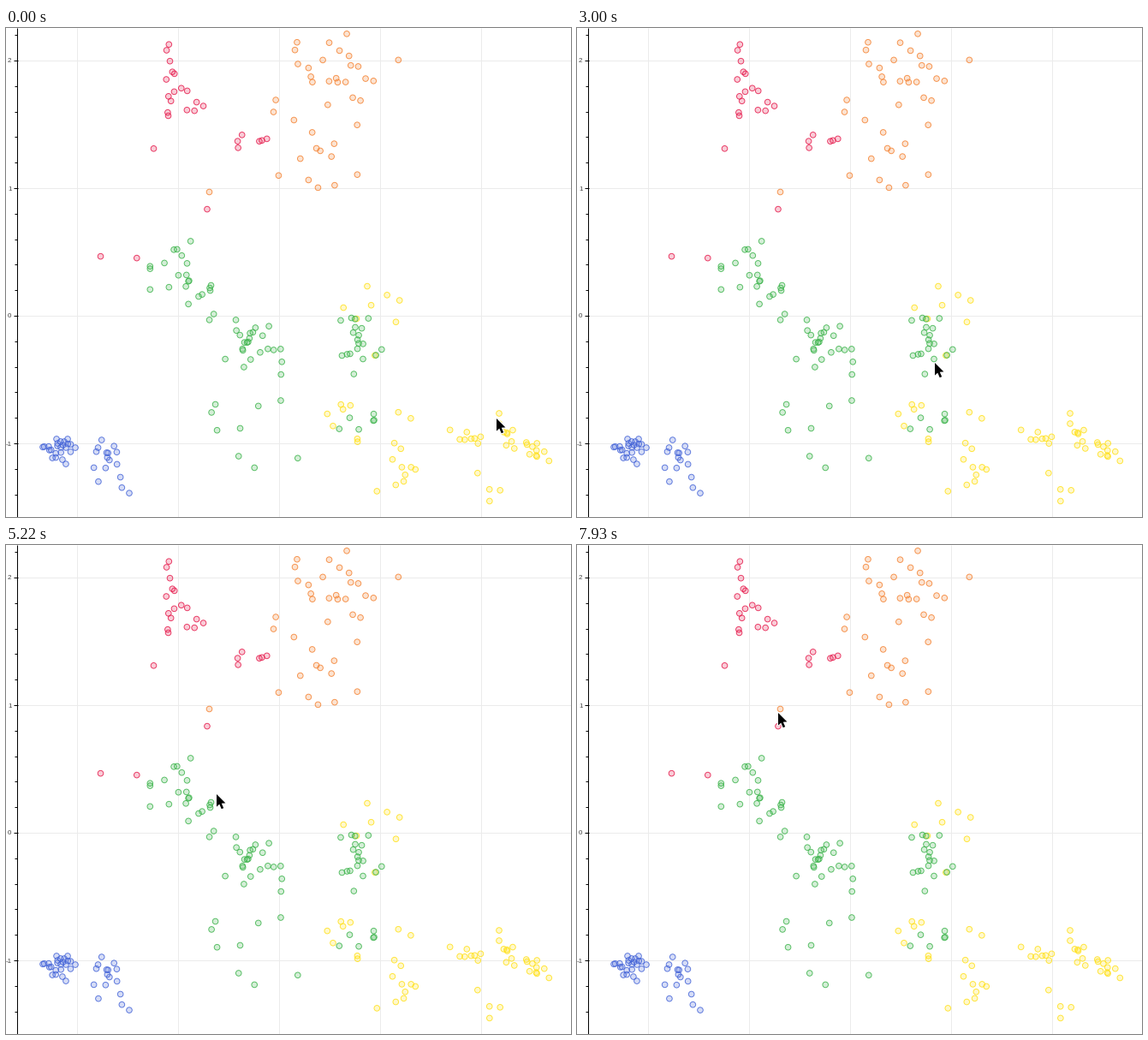
A matplotlib script for the animation above (7990 ms loop, 660 by 571 pixels).

```python
import numpy as np
import matplotlib.pyplot as plt
from matplotlib.animation import FuncAnimation
from matplotlib.patches import Polygon, Rectangle
from matplotlib.transforms import Affine2D

W, H, DPI = 660, 571, 100
LOOP, INTERVAL = 7990, 34
PX = 72 / DPI  # points per pixel

RED, ORANGE, YELLOW = "#e6194b", "#f58231", "#ffe119"
GREEN, BLUE = "#3cb44b", "#4363d8"
CARBON, NITROGEN, OXYGEN = "black", "#3333ff", "#ff1a1a"

# Point clouds: color, count, center x, y, spread x, y, tilt.
CLOUDS = [
    (ORANGE, 26, 398, 60, 45, 28, 0), (ORANGE, 12, 360, 155, 35, 25, 0),
    (RED, 18, 197, 80, 22, 32, 0), (RED, 6, 298, 131, 26, 5, -0.15),
    (RED, 3, 215, 250, 55, 22, 0),
    (YELLOW, 8, 428, 345, 22, 34, 0), (YELLOW, 9, 410, 460, 50, 14, 0),
    (YELLOW, 10, 465, 522, 18, 26, 0.5), (YELLOW, 8, 538, 473, 14, 8, 0),
    (YELLOW, 16, 608, 494, 14, 10, 0.5), (YELLOW, 4, 562, 540, 8, 14, 0),
    (GREEN, 20, 212, 290, 23, 22, 0.2), (GREEN, 24, 283, 368, 25, 20, 0.5),
    (GREEN, 9, 280, 462, 32, 26, 0.2), (GREEN, 18, 407, 370, 17, 18, 0.2),
    (GREEN, 6, 410, 465, 18, 8, -0.2),
    (BLUE, 24, 62, 494, 10, 9, 0.1), (BLUE, 16, 120, 517, 16, 18, 0.6),
]
# Points the pointer visits.
VISITED = {
    ORANGE: [(236.5, 190.5)],
    YELLOW: [(576, 450), (576, 462), (585.5, 474)],
    GREEN: [(417, 386.5), (239.5, 300.5), (225, 313.5)],
}

# Pointer moves: start, end, x, y of the tip on arrival.
START = np.array([573, 456.5])
MOVES = [
    (50, 310, 572, 470), (720, 780, 577, 476), (960, 1140, 581, 467),
    (1380, 1770, 586, 473), (2550, 2990, 418, 391), (3060, 3170, 416, 394),
    (3650, 3770, 415, 387), (4010, 4120, 414, 385), (4650, 5215, 246, 291),
    (5280, 5340, 238, 290), (5450, 5690, 238, 305), (6170, 6560, 222, 312),
    (7290, 7460, 219, 204), (7700, 7920, 235, 196),
]
HOTSPOT = np.array([3, 0.5])

fig = plt.figure(figsize=(W / DPI, H / DPI), dpi=DPI, facecolor="white")
ax = fig.add_axes([0, 0, 1, 1])
ax.set_xlim(0, W)
ax.set_ylim(H, 0)
ax.axis("off")


def line(points, color, width=1.0, z=0, transform=ax.transData):
    x, y = zip(*points)
    return ax.plot(x, y, color=color, lw=width * PX, zorder=z, transform=transform,
                   solid_capstyle="butt", solid_joinstyle="round")[0]


def label(x, y, text, size, color, z, ha="center", transform=ax.transData):
    return ax.text(x, y, text, fontsize=size * PX, color=color, zorder=z, ha=ha,
                   va="center_baseline", family="Liberation Sans",
                   transform=transform)


def draw_axes():
    for x in range(83, W, 118):
        line([(x, 0), (x, H)], "#ebebeb")
    for value in range(-1, 3):
        y = 336 - 149 * value
        line([(13, y), (W, y)], "#ebebeb")
        line([(9, y), (14, y)], "black", z=1)
        label(6.5, y, str(value), 8, "#444444", 1, ha="right")
    for k in range(-7, 12):
        y = 336 - 149 * k / 5
        line([(10, y), (13, y)], "black", z=1)
    line([(13, 0), (13, H)], "black", z=1)


def draw_points(points, color, z):
    x, y = np.transpose(points)
    rgb = tuple(int(color[i:i + 2], 16) / 255 for i in (1, 3, 5))
    # A size per point keeps the subpixel positions.
    ax.scatter(x, y, s=np.full(len(x), (6.6 * PX) ** 2), facecolors=[rgb + (0.22,)],
               edgecolors=[rgb + (0.85,)], linewidths=0.95 * PX, zorder=z)


def draw_clouds():
    rng = np.random.default_rng(7)
    for z, (color, count, cx, cy, sx, sy, tilt) in enumerate(CLOUDS):
        dx, dy = np.clip(rng.normal(size=(2, count)), -1.9, 1.9)
        points = np.column_stack([cx + sx * dx, cy + sy * dy + tilt * sx * dx])
        draw_points(points, color, 2 + z / 10)
    for color, points in VISITED.items():
        draw_points(points, color, 5)


# Molecule geometry: strokes are (color, points), headings are in degrees.
def polygon(cx, cy, r, n=6, turn=-90):
    a = np.radians(turn + 360 / n * np.arange(n))
    return np.column_stack([cx + r * np.cos(a), cy + r * np.sin(a)])


def walk(start, headings, step):
    a = np.radians(headings)
    steps = step * np.column_stack([np.cos(a), np.sin(a)])
    return np.vstack([start, start + np.cumsum(steps, axis=0)])


def closed(ring):
    return [(CARBON, np.vstack([ring, ring[:1]]))]


def aromatic(ring):
    inner = ring * 0.75 + ring.mean(axis=0) * 0.25
    return closed(ring) + [(CARBON, inner[i:i + 2]) for i in (0, 2, 4)]


def bond_to(a, atom, color, reach=0.75):
    """Bond whose far half takes the color of its atom."""
    mid, end = a + (atom - a) * 0.45, a + (atom - a) * reach
    return [(CARBON, [a, mid]), (color, [mid, end])]


def indole():
    benzene = polygon(94.5, 35, 13.8, turn=15)
    pyrrole = polygon(74, 40, 11.8, n=5, turn=17)
    nitrogen = np.array([50.5, 72])
    oxygen = walk(benzene[0], [15], 14)[-1]
    methyl = walk(oxygen, [-45], 13)[-1]
    ring = walk(pyrrole[1], [90, 138], 15)
    cage = walk(pyrrole[2], [152, 191, 120, 62], 14.5)
    tail = walk(cage[1], [95, 145, 180, 145], 12.5)
    strokes = aromatic(benzene) + [
        (CARBON, pyrrole[:3]), (CARBON, pyrrole[1:3] * 0.75 + pyrrole.mean(axis=0) * 0.25),
        (CARBON, ring), (CARBON, cage), (CARBON, tail),
        (CARBON, walk(cage[3], [50], 9))]
    for a, atom, color in [(pyrrole[2], pyrrole[3], NITROGEN),
                           (pyrrole[4], pyrrole[3], NITROGEN),
                           (ring[-1], nitrogen, NITROGEN), (cage[-1], nitrogen, NITROGEN),
                           (benzene[0], oxygen, OXYGEN), (methyl, oxygen, OXYGEN)]:
        strokes += bond_to(a, atom, color)
    return 1.3, strokes, [(pyrrole[3] - (2, 0), "HN", NITROGEN),
                          (nitrogen, "N", NITROGEN), (oxygen, "O", OXYGEN)]


def amino_ketone():
    phenyl = polygon(80.5, 65.5, 13.5)
    carbonyl = walk(phenyl[0], [-90], 14)[-1]
    oxygen = walk(carbonyl, [-30], 13)[-1]
    alpha = walk(carbonyl, [210], 13.5)[-1]
    amine = walk(alpha, [150], 15)[-1]
    strokes = aromatic(phenyl) + [
        (CARBON, [phenyl[0], carbonyl, alpha]), (CARBON, walk(alpha, [-90], 13))]
    for shift in (-1, 1):
        offset = np.array([0.5, 0.9]) * shift
        strokes += bond_to(carbonyl + offset, oxygen + offset, OXYGEN)
    strokes += bond_to(alpha, amine, NITROGEN, reach=0.65)
    return 1.3, strokes, [(amine - (2, 0), "H$_2$N", NITROGEN), (oxygen, "O", OXYGEN)]


def piperidine():
    ring, top, bottom = polygon(72, 39, 6), polygon(80, 25, 6, turn=0), polygon(82, 74, 6)
    ester = walk(ring[0], [220], 5)[-1]
    oxo = walk(ester, [-80], 6)[-1]
    oxygen = walk(ester, [160], 6)[-1]
    chain = walk(ring[3], [80, 35, 90], 6)
    last = walk(chain[-1], [40], 5.5)[-1]
    strokes = aromatic(top) + aromatic(bottom) + closed(ring) + [
        (CARBON, [top[2], ring[0], ester]), (CARBON, walk(oxygen, [120, 175], 5.5)),
        (CARBON, chain), (CARBON, [last, bottom[0]]),
        (NITROGEN, [ring[2], ring[3], ring[4]])]
    for a, atom, color in [(ester, oxo, OXYGEN), (ester, oxygen, OXYGEN),
                           (chain[1], ring[3], NITROGEN), (chain[2], chain[3], OXYGEN),
                           (last, chain[3], OXYGEN)]:
        strokes += bond_to(a, atom, color, reach=1)
    return 1.4, strokes, []


class Tooltip:
    """Card that follows the pointer, on the side with more room."""
    WIDTH, BLOCK, GAP = 142, 85.5, 7

    def __init__(self, start, end, *entries):
        self.start, self.end = start, end
        self.move = Affine2D()
        self.transform = self.move + ax.transData
        on_right = pointer_at(start)[0] < W / 2
        edge = self.GAP if on_right else -self.GAP
        left = edge if on_right else edge - self.WIDTH
        height = 3.5 + self.BLOCK * len(entries)
        box = Rectangle((left, -height / 2), self.WIDTH, height, fc="white", ec="#e8e8e8",
                        lw=PX, zorder=10, transform=self.transform)
        arrow = Polygon([(0, 0), (edge, -6), (edge, 6)], fc="#909599", ec="none",
                        zorder=11, transform=self.transform)
        self.artists = [ax.add_patch(box), ax.add_patch(arrow)]
        for i, entry in enumerate(entries):
            top = -height / 2 + i * self.BLOCK
            if i:
                self.add_line([(left, top + 3), (left + self.WIDTH, top + 3)], "#f2f2f2")
            self.add_entry(left, top, *entry)

    def add_line(self, points, color, width=1.0):
        self.artists.append(line(points, color, width, 12, self.transform))

    def add_text(self, x, y, text, size, color, ha="center"):
        self.artists.append(label(x, y, text, size, color, 13, ha, self.transform))

    def add_entry(self, left, top, mol_id, molecule):
        width, strokes, atoms = molecule()
        self.add_text(left + 4, top + 9, f"MolID: {mol_id}", 8.1, "#444444", "left")
        for color, points in strokes:
            self.add_line(np.add(points, (left, top)), color, width)
        for (x, y), text, color in atoms:
            self.add_text(left + x, top + y, text, 8.5, color)

    def update(self, t, hotspot):
        self.move.clear().translate(*hotspot)
        for artist in self.artists:
            artist.set_visible(self.start <= t < self.end)


def pointer_at(t):
    tip = START
    for start, end, x, y in MOVES:
        u = np.clip((t - start) / (end - start), 0, 1)
        tip = tip + (np.array([x, y]) - tip) * u * u * (3 - 2 * u)
    return tip


draw_axes()
draw_clouds()
tooltips = [
    Tooltip(110, 190, (212, amino_ketone)),
    Tooltip(1500, 2550, (198, amino_ketone)),
    Tooltip(3150, 3680, (127, indole)),
    Tooltip(3680, 4655, (134, indole), (206, amino_ketone)),
    Tooltip(5530, 5620, (24, piperidine)),
    Tooltip(6260, 6360, (17, piperidine)),
    Tooltip(6440, 7290, (11, piperidine)),
]

arrow_shape = np.array([(0, 0), (0, 14.6), (3.3, 11.6), (5.7, 17.2),
                        (8.2, 16.2), (5.8, 10.7), (10.4, 10.4)])
halo = ax.add_patch(Polygon(arrow_shape, fc="white", ec="white", lw=2.2 * PX, zorder=20))
pointer = ax.add_patch(Polygon(arrow_shape, fc="black", ec="none", zorder=21))


def update(frame):
    t = (frame + 0.5) * INTERVAL
    tip = np.round(pointer_at(t))
    for patch in (halo, pointer):
        patch.set_xy(arrow_shape + tip)
    for tooltip in tooltips:
        tooltip.update(t, tip + HOTSPOT)
    return halo, pointer


anim = FuncAnimation(fig, update, frames=LOOP // INTERVAL, interval=INTERVAL,
                     repeat=True, repeat_delay=0)
plt.show()
```
